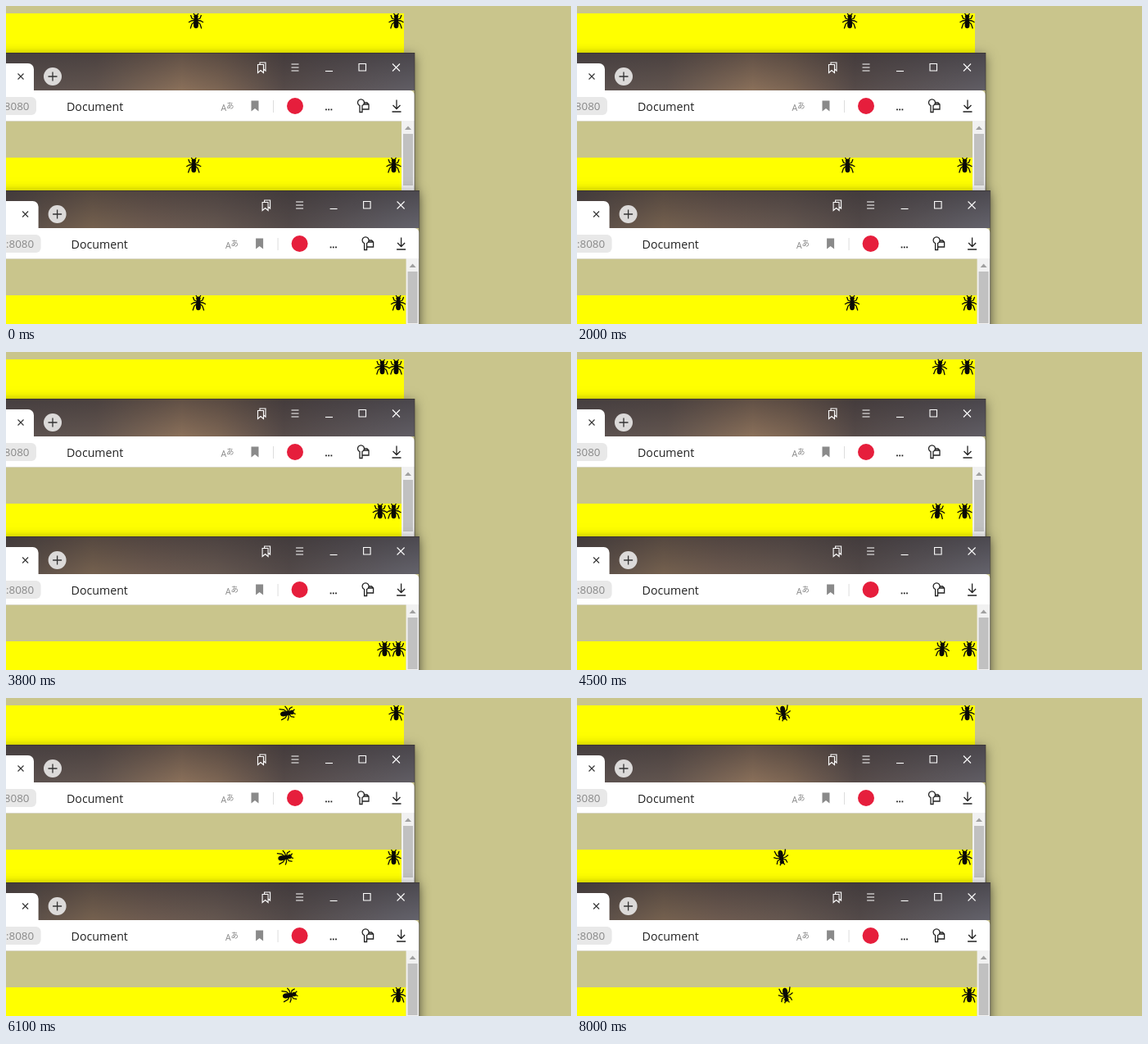
Animation of 690 by 388 pixels, one loop 8100 ms. Source, as an HTML page with a canvas:

```html
<!DOCTYPE html>
<html lang="en">
<head>
<meta charset="utf-8">
<title>Ants</title>
<style>
html, body { margin: 0; width: 100%; height: 100%; overflow: hidden; }
canvas { display: block; }
</style>
</head>
<body>
<canvas id="stage" width="690" height="388"></canvas>
<script>
const ctx = document.getElementById('stage').getContext('2d');
const LOOP = 8100, TICK = 100;
const OLIVE = '#c9c58c';

// Ticks on which the picture stays as it was
const held = new Set([3, 5, 11, 16, 21, 24, 29, 34, 41, 43, 46, 48, 51, 53,
  57, 59, 63, 66, 71, 73, 74, 76, 77, 79]);

// [ms, value] points, joined by smooth curves
const walk = [[0, 232], [500, 246], [1200, 278.5], [2800, 390.5], [3800, 459.5],
  [4150, 466], [4500, 443], [4700, 422], [5200, 405], [5800, 362],
  [6500, 321], [7000, 294], [7500, 271], [8000, 252]];
const turn = [[4300, 0], [5200, 24], [7000, 135], [8000, 170]];

function sample(points, t) {
  const last = points.length - 1;
  if (t <= points[0][0]) return points[0][1];
  if (t >= points[last][0]) return points[last][1];
  const slope = i => {
    const a = points[Math.max(i - 1, 0)], b = points[Math.min(i + 1, last)];
    return (b[1] - a[1]) / (b[0] - a[0]);
  };
  const i = points.findIndex(p => p[0] > t) - 1;
  const [t0, v0] = points[i], [t1, v1] = points[i + 1];
  const d = t1 - t0, s = (t - t0) / d, s2 = s * s, s3 = s2 * s;
  return v0 + (v1 - v0) * (3 * s2 - 2 * s3) +
    d * (slope(i) * (s3 - 2 * s2 + s) + slope(i + 1) * (s3 - s2));
}

function rect(x, y, w, h, color, radius = 0) {
  ctx.fillStyle = color;
  ctx.beginPath();
  ctx.roundRect(x, y, w, h, radius);
  ctx.fill();
}

function disc(x, y, rx, ry, color) {
  ctx.fillStyle = color;
  ctx.beginPath();
  ctx.ellipse(x, y, rx, ry, 0, 0, Math.PI * 2);
  ctx.fill();
}

function line(path, color, width = 1.1) {
  ctx.strokeStyle = color;
  ctx.lineWidth = width;
  ctx.stroke(new Path2D(path));
}

function text(str, x, y, size, color, align = 'left') {
  ctx.font = `${size}px "Open Sans", "Noto Sans CJK JP", sans-serif`;
  ctx.textAlign = align;
  ctx.fillStyle = color;
  ctx.fillText(str, x, y);
}

function at(x, y, paint) {
  ctx.save();
  ctx.translate(x, y);
  paint();
  ctx.restore();
}

function ant(x, y, angle = 0) {
  at(x, y, () => {
    ctx.rotate(angle * Math.PI / 180);
    for (const side of [1, -1]) {
      ctx.scale(side, 1);
      line('M1 -2L5 -3.5L6.5 -7.5M1 -1L5.5 -.5L9 1.5M1 0L5 3.5L6.8 9M1 -6.5L3 -9.5', '#0a0a06', 1.3);
    }
    disc(0, -5.6, 2.7, 2.4, '#0a0a06');
    disc(0, -1.2, 2.5, 3.2, '#0a0a06');
    disc(0, 4.2, 3, 4.6, '#0a0a06');
  });
}

function band(right, y, antX, angle) {
  rect(-20, y, right + 20, 47, '#ff0');
  ant(antX, y + 9.5, angle);
  ant(right - 9.5, y + 9.5);
}

function titleBar(stops) {
  const fill = ctx.createLinearGradient(0, 0, 499, 0);
  stops.forEach(([pos, color]) => fill.addColorStop(pos, color));
  rect(-20, 0, 519, 46, fill);
  const shade = ctx.createLinearGradient(0, 0, 0, 46);
  shade.addColorStop(0, 'rgba(45,40,44,.45)');
  shade.addColorStop(1, 'rgba(45,40,44,0)');
  rect(-20, 0, 519, 46, shade);

  rect(-20, 13, 54, 40, '#fff', [0, 7, 0, 0]);
  line('M14.5 25.5l7 7m0 -7l-7 7', '#333');
  disc(57, 29, 11, 11, '#dcdad9');
  line('M51.5 29h11M57 23.5v11', '#333', 1.3);

  line('M307.5 14.5h7v10l-3.5 -3l-3.5 3zM310 14.5v-2.5h7v10l-2.5 -2', '#fff');
  line('M348.5 14h9M348.5 18h9M348.5 22h9', '#fff');
  line('M390 22.5h9', '#fff');
  line('M431 13.5h8.5v8.5h-8.5z', '#fff');
  line('M472 13.5l9 9m0 -9l-9 9', '#fff');
}

function toolBar() {
  rect(-20, 46, 519, 37, '#fff', [0, 6, 0, 0]);
  rect(-20, 54, 57, 22, '#e8e8e8', 6);
  text(':8080', 28.5, 70, 13.4, '#888', 'right');
  text('Document', 74, 70.5, 14.2, '#222');
  text('A', 262.5, 71, 10.5, '#888');
  text('あ', 269, 68, 9.5, '#888');
  ctx.fillStyle = '#8a8a8a';
  ctx.fill(new Path2D('M299.5 58.5h9v13l-4.5 -3.5l-4.5 3.5z'));
  line('M326.5 58v15', '#ddd', 1);
  disc(353, 65, 10, 10, '#e61e3c');
  for (const x of [391, 394.2, 397.4]) rect(x - .9, 68.5, 1.8, 1.8, '#222');
  line('M432 64.5v8h3v-8a4 4 0 1 0 -3 0zM437 61h4l2 2v6h-7.5M443 63h-6', '#222', 1.3);
  line('M477 57.5v11m-4.5 -4.5l4.5 4.5l4.5 -4.5M471.5 72h11', '#222', 1.3);
}

function browser(x, y, stops, antX, angle) {
  at(x, y, () => {
    ctx.save();
    ctx.shadowColor = 'rgba(0,0,0,.5)';
    ctx.shadowBlur = 13;
    ctx.shadowOffsetY = 3;
    rect(-20, 0, 519, 400, OLIVE);
    ctx.restore();
    titleBar(stops);
    toolBar();
    rect(-20, 83, 519, 1, '#d8d6c4');
    band(483, 128, antX, angle);
    rect(483, 83, 16, 320, '#f1f1f1');
    rect(485, 99, 12, 63, '#c1c1c1');
    ctx.fillStyle = '#a0a0a0';
    ctx.fill(new Path2D('M487 94l4 -4.5l4 4.5z'));
    rect(498.5, 0, 1, 400, 'rgba(60,55,50,.6)');
    rect(-20, 0, 519, 1, 'rgba(50,45,45,.6)');
  });
}

const upperBar = [[0, '#59504f'], [.22, '#62554f'], [.43, '#8a705a'],
  [.52, '#7d6654'], [.68, '#564b49'], [1, '#615e65']];
const lowerBar = [[0, '#544a47'], [.2, '#75614f'], [.34, '#6d5b50'],
  [.5, '#655750'], [.68, '#534a49'], [1, '#64636c']];

function draw(now) {
  let tick = Math.floor(now % LOOP / TICK);
  while (held.has(tick)) tick--;
  const t = tick * TICK;
  const x = sample(walk, t), angle = sample(turn, t);

  rect(0, 0, 690, 388, OLIVE);
  band(486, 9, x, angle);
  rect(0, 56, 486, 4, '#ff0');
  browser(0, 57, upperBar, x - 2.7, angle);
  browser(5.6, 225, lowerBar, x - 2.7, angle);
}

const start = performance.now();
function frame() {
  draw(performance.now() - start);
  requestAnimationFrame(frame);
}
frame();
</script>
</body>
</html>
```
